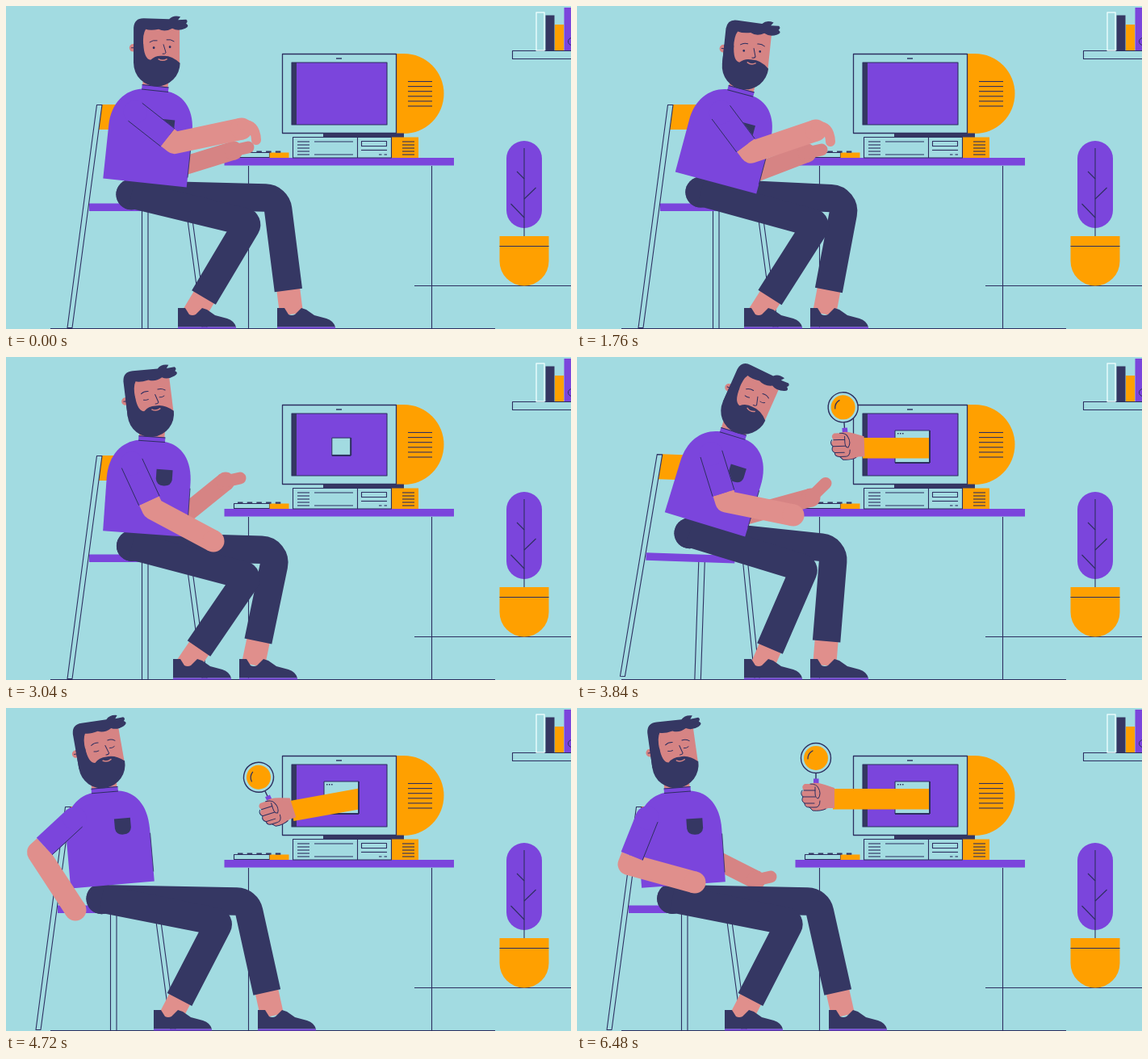
An HTML page with a canvas for the animation above (6.56 s loop, 700x400 px).

```html
<!DOCTYPE html>
<html lang="en">
<head>
<meta charset="utf-8">
<title>Desk</title>
<style>
html, body { margin: 0; width: 100%; height: 100%; overflow: hidden; background: #a2dbe1; }
canvas { display: block; }
</style>
</head>
<body>
<canvas id="stage" width="700" height="400"></canvas>
<script>
const c = document.getElementById('stage').getContext('2d');
const SKY = '#a2dbe1', PURPLE = '#7b45dc', NAVY = '#353763', ORANGE = '#ffa000';
const SKIN = '#e08f8c', SHADE = '#d68484', LINE = '#2d2f60';
const LOOP = 6560, STEP = 80;

// Motion helpers
const clamp = u => Math.min(1, Math.max(0, u));
const rad = d => d * Math.PI / 180;
function ramp(t, from, to) {
  const u = clamp((t - from) / (to - from));
  return u * u * (3 - 2 * u);
}
function turn(x, y, angle) {
  const cos = Math.cos(rad(angle)), sin = Math.sin(rad(angle));
  return [x * cos - y * sin, x * sin + y * cos];
}
// Middle joint of a two-bone limb; side picks the bend direction
function joint([x1, y1], [x2, y2], first, second, side) {
  const dist = Math.hypot(x2 - x1, y2 - y1), dx = (x2 - x1) / dist, dy = (y2 - y1) / dist;
  const along = (first * first + dist * dist - second * second) / (2 * dist);
  const out = side * Math.sqrt(Math.max(0, first * first - along * along));
  return [x1 + dx * along - dy * out, y1 + dy * along + dx * out];
}

// Drawing helpers
function box(color, x, y, w, h) { c.fillStyle = color; c.fillRect(x, y, w, h); }
function trace(points) {
  c.beginPath();
  points.forEach(([x, y]) => c.lineTo(x, y));
}
function fill(color, points) { trace(points); c.fillStyle = color; c.fill(); }
function stroke(color, width, points, cap = 'butt') {
  trace(points);
  c.strokeStyle = color; c.lineWidth = width; c.lineCap = cap; c.lineJoin = 'round';
  c.stroke();
}
function outline(points) {
  trace(points); c.closePath();
  c.strokeStyle = LINE; c.lineWidth = 1.1; c.stroke();
}
function line(x1, y1, x2, y2, w = 1.1) { stroke(LINE, w, [[x1, y1], [x2, y2]]); }
function frame(x, y, w, h, color = LINE, lw = 1.1) {
  c.strokeStyle = color; c.lineWidth = lw; c.strokeRect(x, y, w, h);
}
function disc(color, x, y, r) {
  c.beginPath(); c.arc(x, y, r, 0, 7); c.fillStyle = color; c.fill();
}
function ring(x, y, r, w) {
  c.beginPath(); c.arc(x, y, r, 0, 7); c.strokeStyle = LINE; c.lineWidth = w; c.stroke();
}
function shape(color, d) { c.fillStyle = color; c.fill(new Path2D(d)); }
function curve(color, width, d) {
  c.strokeStyle = color; c.lineWidth = width; c.lineCap = 'round';
  c.stroke(new Path2D(d));
}
function at(x, y, angle, draw) {
  c.save(); c.translate(x, y); c.rotate(rad(angle)); draw(); c.restore();
}

function drawRoom() {
  box(SKY, 0, 0, 700, 400);
  line(55, 399.5, 606, 399.5);
  line(506, 346.5, 700, 346.5);

  frame(627.5, 55.5, 80, 10);
  frame(657, 8, 10, 47, '#e6fcfb', 1.5);
  box(NAVY, 668.5, 11.5, 11, 43.5);
  box(ORANGE, 680, 23, 11, 32);
  box(PURPLE, 691.5, 2, 9, 53);
  ring(701, 44, 4.5, 1);

  c.beginPath(); c.roundRect(620, 167, 44, 108, 22); c.fillStyle = PURPLE; c.fill();
  line(642, 176, 642, 285);
  line(642, 214, 633, 205); line(642, 239, 656.5, 225); line(642, 262, 625.5, 245);
  shape(ORANGE, 'M611.5 285H672.5V316A30.5 30.5 0 0 1 611.5 316Z');
  line(611.5, 297.5, 672.5, 297.5);
}

function drawDesk() {
  line(300.5, 198, 300.5, 400); line(527.5, 198, 527.5, 400);
  box(PURPLE, 270.5, 188, 284.5, 9.5);

  shape(ORANGE, 'M484 59H493A49 49 0 0 1 493 158H484Z');
  for (let i = 0; i < 6; i++) line(498, 93.5 + i * 6.1, 528, 93.5 + i * 6.1);
  frame(342.5, 59.5, 141, 98, LINE, 1.3);
  line(409, 65, 416, 65, 1.4);
  box(PURPLE, 354, 70, 118, 77);
  box(NAVY, 354, 70, 6, 77);
  frame(354, 70, 118, 77);
  box(NAVY, 393, 157.5, 100, 5.5);

  box(ORANGE, 477.5, 162.5, 33.5, 25.5);
  frame(355.5, 162.5, 122, 25.5);
  line(435.5, 162.5, 435.5, 188);
  for (let y = 168; y < 186; y += 4) { line(361, y, 376, y); line(491, y, 506, y); }
  line(382, 168, 430, 168); line(382, 184, 430, 184);
  frame(440.5, 167.5, 31, 6);
  line(440, 178.5, 472, 178.5);
  line(462, 184, 465.5, 184); line(468.5, 184, 472, 184);

  frame(282.5, 181.5, 44, 6);
  box(ORANGE, 326.5, 181.5, 24, 6.5);
  for (let x = 287; x < 340; x += 11.7) box(NAVY, x, 179.5, 6.5, 2.2);
}

function drawChair(shift, tilt) {
  at(172 + shift, 400, tilt, () => {
    c.translate(-172, -400);
    fill(ORANGE, [[119, 122], [152, 122], [152, 153], [115, 153]]);
    outline([[112.5, 122.5], [119, 122.5], [82, 398.5], [76, 398.5]]);
    outline([[168.5, 250], [176, 250], [176, 400], [168.5, 400]]);
    outline([[223, 250], [229, 250], [249, 398], [243, 398]]);
    box(PURPLE, 103, 244.5, 110, 9.5);
  });
}

function drawLeg(hip, ankle, foot, thigh, shin, bend) {
  const [kx, ky] = joint(hip, ankle, thigh, shin, -1), [nx, ny] = ankle;
  const len = Math.hypot(nx - kx, ny - ky), dx = (nx - kx) / len, dy = (ny - ky) / len;
  stroke(SKIN, 29, [[nx - dx * 4, ny - dy * 4], [nx + dx * 30, ny + dy * 30]]);
  disc(NAVY, ...hip, 19);
  c.beginPath();
  c.moveTo(...hip);
  c.arcTo(kx, ky, nx, ny, bend);
  c.lineTo(nx, ny);
  c.strokeStyle = NAVY; c.lineWidth = 34.5; c.lineCap = 'butt'; c.lineJoin = 'round';
  c.stroke();
  at(foot, 0, 0, () => {
    shape(NAVY, 'M0 374H9L14 382Q18 384 22 382L30 374L36 376L46 383L61 387Q70 390 72 397.5H0Z');
    box(PURPLE, 0, 397.5, 72, 2);
  });
}

// Local space: origin at the middle of the shirt hem
function drawTorso() {
  box(SHADE, -15.5, -130, 31.5, 12);
  shape(PURPLE, 'M-52 0V-66C-52 -95 -36 -112 -16 -115.5H17C38 -113 52 -95 52 -66V0Z');
  box(PURPLE, -16, -121, 33, 7);
  line(-16, -120.5, 17, -120.5, 1); line(-16, -115, 17, -115, 1);
  line(52, -60, 52, -12, 0.8);
  shape(NAVY, 'M9 -81H29V-69Q28 -61 19 -61Q10 -61 9 -69Z');
}

// Local space: origin at the middle of the beard
function drawHead(open) {
  disc(SHADE, -29.5, -19, 4.8);
  line(-32, -19, -28, -19, 1);
  box(SHADE, -19, -46, 47, 50);
  shape(NAVY, 'M-29 0V-44Q-28 -56 -16 -55.5L15 -54.5Q20 -60 29 -57.5L26 -53.5L36 -54Q39 -52 36 -49Q41 -46 35 -43Q26 -39 19 -43Q10 -38 2 -42Q-8 -40 -14 -42Q-18 -36 -17 -22V0Z');
  shape(NAVY, 'M-29 -24H-17Q-16 -5 -8 -4Q-2 -10 7 -9Q18 -10 28.5 0A28.7 28.7 0 0 1 -29 0Z');
  curve(SHADE, 1.5, 'M2 -5Q7 -2 12 -5');
  curve(LINE, 1, 'M8 -23L11 -13Q10 -11 7 -11.5');
  curve(LINE, 1, 'M-9 -26Q-5 -29 0 -28M12 -29Q17 -30 21 -27');
  if (open) { disc(LINE, -4, -19, 1.4); disc(LINE, 16, -20, 1.4); }
  else curve(LINE, 0.9, 'M-7 -18Q-4 -17 -1 -18M13 -19Q16 -18 19 -20');
}

function drawBackArm(shoulder, elbow, wrist, lift) {
  const [sx, sy] = shoulder, [ex, ey] = elbow, [wx, wy] = wrist;
  stroke(SHADE, 23, [elbow, wrist]);
  disc(SHADE, wx, wy, 11.5);
  stroke(SHADE, 15, [wrist, [wx + 18, wy - 4 - lift]], 'round');
  stroke(NAVY, 14, [shoulder, [sx + (ex - sx) * 0.85, sy + (ey - sy) * 0.85]]);
}

function drawFrontArm(shoulder, wrist, typing, tap, bothSeams) {
  const elbow = joint(shoulder, wrist, 62, 85, 1);
  const [sx, sy] = shoulder, [ex, ey] = elbow, [wx, wy] = wrist;
  const len = Math.hypot(ex - sx, ey - sy), dx = (ex - sx) / len, dy = (ey - sy) / len;
  const tx = ex - dx * 11, ty = ey - dy * 11;
  stroke(SKIN, 27, [[tx, ty], elbow, wrist]);
  disc(SKIN, wx, wy, 13.5);
  if (typing > 0) {
    const fx = wx + 18 * typing, fy = wy + (14 + tap) * typing;
    curve(SKIN, 12, `M${wx} ${wy - 5}Q${fx - 1} ${wy - 7} ${fx} ${fy}`);
  }
  stroke(PURPLE, 29, [shoulder, [tx, ty]]);
  disc(PURPLE, sx, sy, 14.5);
  for (const k of bothSeams ? [14, -14] : [14])
    line(sx + dy * k, sy - dx * k, tx + dy * k, ty - dx * k, 1);
}

function drawPopup(k) {
  if (k <= 0) return;
  const w = 43 * k, h = 40 * k, x = 415.5 - w / 2, y = 111 - h / 2;
  box(SKY, x, y, w, h);
  frame(x, y, w, h, LINE, 1);
  line(x + w, y, x + w, y + h, 2); line(x, y + h, x + w, y + h, 2);
  if (k > 0.9) for (let i = 0; i < 3; i++) box(LINE, x + 3 + i * 3, y + 3, 1.5, 1.5);
}

// Arm reaching out of the screen with a magnifying glass
function drawReach(out, dip, relax) {
  if (out <= 0) return;
  const x = 425 - 89 * out - 37 * relax, y = 110 + 18 * dip, k = 0.2 + 0.8 * out;
  const dx = 436 - x, dy = 110 - y, slope = Math.atan2(dy, dx) * 180 / Math.PI;
  const tilt = -4 * (1 - relax) - 21 * dip;
  c.save();
  c.beginPath(); c.rect(0, 0, 436, 400); c.clip();
  at(x, y, slope, () => box(ORANGE, 18 * k, -10, Math.hypot(dx, dy), 25.5));
  at(x, y, tilt, () => {
    c.scale(k, k);
    disc(SKY, -3, -48, 18.5);
    disc(ORANGE, -3, -48, 15);
    ring(-3, -48, 18.5, 1.4);
    curve(LINE, 1.2, 'M-13 -47Q-13 -54 -7 -57');
    line(-3, -29, -3, -22, 1.4);
    box(PURPLE, -6, -22.5, 6.5, 8);
  });
  at(x, y, (slope + tilt) / 2, () => {
    c.scale(k, k);
    shape(SHADE, 'M20 -11L8 -15Q-4 -19 -10 -16L-17 -16Q-22 -13 -18 -8Q-23 -4 -19 0Q-22 5 -17 8Q-17 13 -11 13L-7 17Q5 18 12 14L20 14Z');
    curve(LINE, 1, 'M-18 -8H-4M-19 0H-4M-17 8H-5M-10 -16Q-2 -16 0 -11Q4 -4 0 2Q-4 2 -4 -5V-12M-11 13H-5Q2 14 2 5M-20 -8Q-23 -4 -19 0Q-22 5 -17 8Q-17 13 -11 13L-7 17Q3 18 9 15');
  });
  c.restore();
}

function draw(t) {
  // Six acts: sit up, lean in, rest, startle, recoil, relax
  const acts = [ramp(t, 0, 800), ramp(t, 960, 1440), ramp(t, 2240, 2800),
    ramp(t, 3600, 3840), ramp(t, 3840, 4280), ramp(t, 4960, 5760)];
  const [sit, reach, rest, , recoil, relax] = acts;
  const through = (...stops) => acts.reduce((v, u, i) => v + (stops[i + 1] - stops[i]) * u, stops[0]);

  // The chair slides back fast, hopping as it goes; the body follows late
  const slide = 1 - (1 - clamp((t - 3600) / 680)) ** 2;
  const hop = Math.sin(Math.PI * slide);
  const lean = through(6, 0.5, 15, 4, 17, -5, -4);
  const nod = through(0, -5, 6, -7, 24, -10, -8);
  const x = 172 - 40 * slide ** 2, y = 219 - 12 * hop;
  const onBody = (px, py) => {
    const [dx, dy] = turn(px, py, lean);
    return [x + dx, y + dy];
  };

  const hip = onBody(-15, 16), neck = onBody(0, -122);
  const [hx, hy] = turn(0, -27, nod + 5);
  const shoulder = onBody(-24 + lean / 2 - 13 * slide ** 3, -86);
  const footA = 213 - 6 * sit - 24 * recoil, footB = 336 - 47 * reach + 23 * recoil;
  const wrist = [through(292, 292, 296, 257, 268, 86, 146), through(152, 156, 154, 228, 196, 250, 216)];
  const farWrist = [through(282, 264, 285, 272, 290, 150, 222), through(179, 151, 182, 154, 174, 203, 213)];
  const tap = 3 * Math.sin(2 * Math.PI * t / 440);
  farWrist[1] -= tap * (1 - rest) / 2;

  drawRoom();
  drawDesk();
  drawPopup(ramp(t, 2680, 3360));
  drawReach(ramp(t, 3280, 3840), ramp(t, 4240, 4640) - relax, relax);
  drawChair(-39 * slide, 2 * hop);
  drawBackArm(onBody(36, -80), onBody(46, -26), farWrist, 14 * hop);
  drawLeg(hip, [50 + footB * 0.8 + hip[0] * 0.2, 352], footB, 180, 115, 16);
  drawLeg(hip, [footA + 32, 361], footA, 149, 108, 4);
  at(x, y, lean, drawTorso);
  at(neck[0] + hx, neck[1] + hy, nod, () => drawHead(through(1, 0, 1, 0, 0, 0, 0) > 0.5));
  drawFrontArm(shoulder, wrist, 1 - rest, tap, slide < 0.8);
}

const start = performance.now();
function tick() {
  const t = (performance.now() - start) % LOOP;
  draw(Math.floor(t / STEP) * STEP);
  requestAnimationFrame(tick);
}
tick();
</script>
</body>
</html>
```
